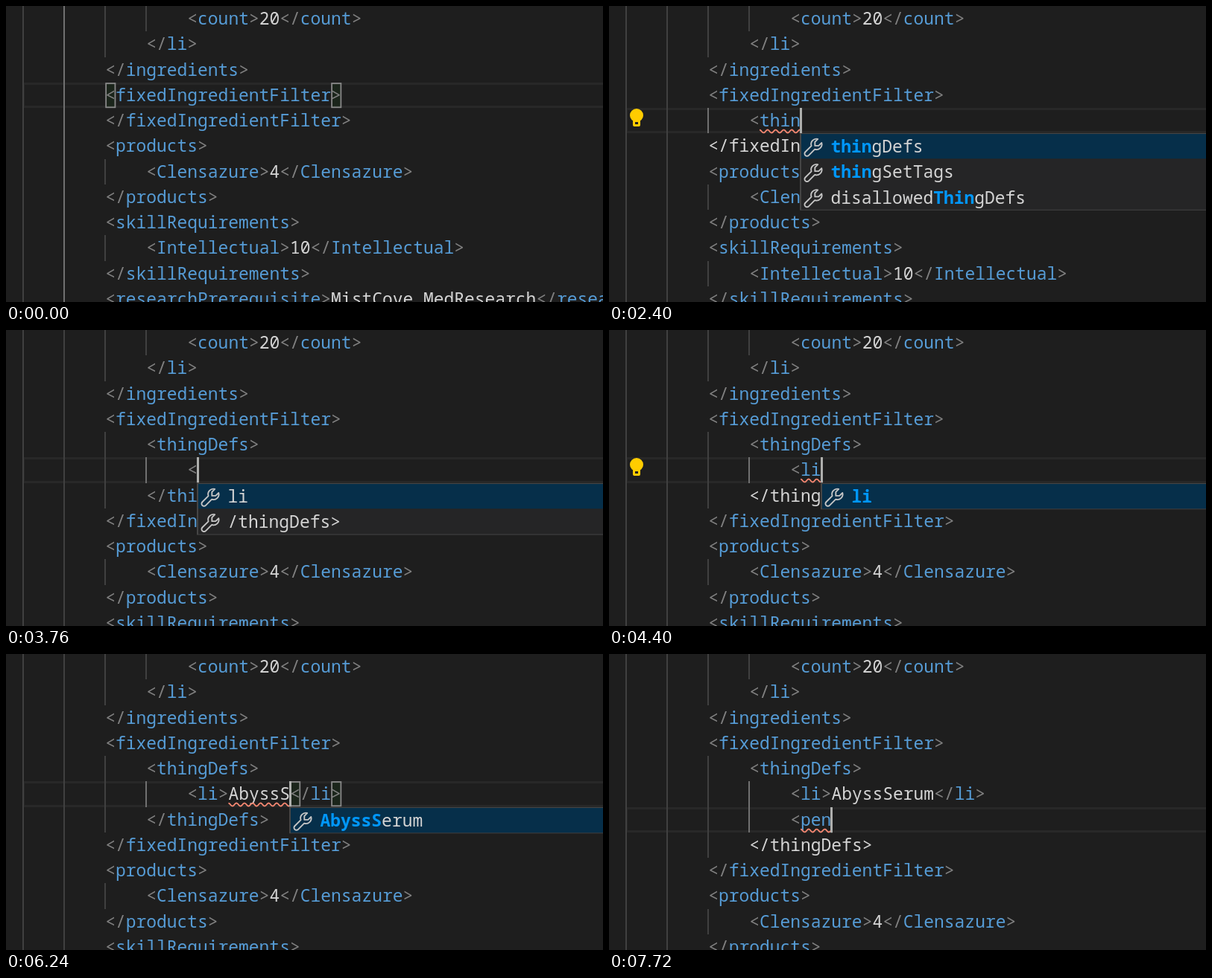
An HTML page with a canvas for the animation above (8 s loop, 801 by 398 pixels).

```html
<!DOCTYPE html>
<html lang="en">
<head>
<meta charset="utf-8">
<style>
  html, body { margin: 0; height: 100%; overflow: hidden; background: #1e1e1e; }
  canvas { display: block; }
</style>
</head>
<body>
<canvas width="801" height="398"></canvas>
<script>
const ctx = document.querySelector('canvas').getContext('2d');
const LOOP = 8000, ROW = 34.25, CHAR = 13.77, LEFT = 23;
const FONT = '22.95px "Noto Sans Mono", monospace';
const pad = n => ' '.repeat(n);
const colX = col => LEFT + col * CHAR;
const rowY = row => Math.round(row * ROW);

const HEAD = [
  pad(16) + '<count>20</count>',
  pad(12) + '</li>',
  pad(8) + '</ingredients>',
];
const TAIL = [
  pad(8) + '</fixedIngredientFilter>',
  pad(8) + '<products>',
  pad(12) + '<Clensazure>4</Clensazure>',
  pad(8) + '</products>',
  pad(8) + '<skillRequirements>',
  pad(12) + '<Intellectual>10</Intellectual>',
  pad(8) + '</skillRequirements>',
  pad(8) + '<researchPrerequisite>MistCove_MedResearch</researchPrerequisite>',
];
const FILTER = pad(8) + '<fixedIngredientFilter>';
const FIELDS = ['thingDefs', 'thingSetTags', 'disallowedThingDefs', 'thirdTierUse',
  'categories', 'allowedQualities', 'specialFilters', 'stuffCategories'];
const DEFS = ['Abbr', 'AbyssSerum', 'AnimalBed', 'Ambrosia', 'Apparel_BasicShirt', 'Apparel_BowlerHat'];
const CHILDREN = ['li', '/thingDefs>'];

// Edited block at each nesting depth; "|" marks the caret
const inFilter = s => [FILTER, pad(12) + s];
const inDefs = (...items) =>
  [FILTER, pad(12) + '<thingDefs>', ...items.map(s => pad(16) + s), pad(12) + '</thingDefs>'];
const def = s => inDefs(`<li>${s}|</li>`);
const second = s => inDefs('<li>AbyssSerum</li>', s + '|');

const STEPS = [
  [0, [FILTER + '|'], { noCaret: true }],
  [1520, inFilter('|'), { match: [3, 8, 30] }],
  [1600, inFilter('|')],
  [1920, inFilter('<|'), { list: FIELDS }],
  [2080, inFilter('<t|'), { list: FIELDS, bulb: true }],
  [2120, inFilter('<th|'), { list: FIELDS, bulb: true }],
  [2200, inFilter('<thi|'), { list: FIELDS, bulb: true }],
  [2400, inFilter('<thin|'), { list: FIELDS, bulb: true }],
  [2520, inFilter('<thing|'), { list: FIELDS, bulb: true }],
  [2760, inFilter('<thingDefs|')],
  [3000, inFilter('<thingDefs>|')],
  [3080, inFilter('<thingDefs>|</thingDefs>')],
  [3440, inDefs('|')],
  [3760, inDefs('<|'), { list: CHILDREN }],
  [4000, inDefs('<l|'), { list: CHILDREN }],
  [4400, inDefs('<li|'), { list: CHILDREN, bulb: true }],
  [4480, inDefs('<li|'), { bulb: true }],
  [4560, inDefs('<li>|'), { bulb: true }],
  [4640, def(''), { bulb: true }],
  [4880, def('')],
  [5320, def('A')],
  [5400, def('A'), { list: DEFS }],
  [5560, def('Ab'), { list: DEFS }],
  [5720, def('Aby'), { list: DEFS }],
  [5880, def('Abys'), { list: DEFS }],
  [6040, def('Abyss'), { list: DEFS }],
  [6240, def('AbyssS'), { list: DEFS }],
  [6480, def('AbyssSerum')],
  [6960, second(''), { match: [5, 30, 34] }],
  [7040, second('')],
  [7200, second('<'), { list: [...CHILDREN, 'prefab'] }],
  [7400, second('<p'), { list: ['prefab'] }],
  [7680, second('<pe')],
  [7720, second('<pen')],
];
const POINTER = [[520, 614, 326], [600, 560, 215], [680, 512, 108], [840, 459, 110],
  [920, 500, 112], [1000, 580, 115], [1080, 680, 120], [1160, 780, 125], [1240, -50, 0]];
const WRENCH = new Path2D('M11.3 1.7A4.2 4.2 0 0 0 6.2 7.1L1.4 11.9A1.9 1.9 0 0 0 4.1 14.6' +
  'L8.9 9.8A4.2 4.2 0 0 0 14.3 4.7L11.9 7H9V4.1Z');

const current = (steps, t) => steps.findLast(step => step[0] <= t);

function rect(x, y, w, h, color) {
  ctx.fillStyle = color;
  ctx.fillRect(x, y, w, h);
}

function write(text, x, y, color, weight = '') {
  ctx.font = `${weight} ${FONT}`;
  ctx.fillStyle = color;
  ctx.fillText(text, x, y);
}

function drawCode(line, row, plain) {
  let inTag = false;
  for (const { 0: token, index } of line.matchAll(/<\/?|>|[^<>\s]+/g)) {
    const bracket = /[<>]/.test(token);
    const color = plain ? '#d4d4d4' : bracket ? '#808080' : inTag ? '#569cd6' : '#d4d4d4';
    write(token, colX(index), rowY(row) + 25, color);
    if (bracket) inTag = token !== '>';
  }
}

function drawGuides(lines, caretRow) {
  const own = line => line.search(/\S/);
  const depth = lines.map((line, i) =>
    line.trim() ? own(line) : Math.max(own(lines[i - 1]), own(lines[i + 1])));
  const active = depth[caretRow] - 4;
  let first = caretRow, last = caretRow;
  while (depth[first - 1] > active) first--;
  while (depth[last + 1] > active) last++;
  depth.forEach((d, row) => {
    for (let col = 0; col < d; col += 4) {
      const lit = col === active && row >= first && row <= last;
      rect(Math.round(colX(col) - 1), rowY(row), 2, rowY(row + 1) - rowY(row), lit ? '#707070' : '#404040');
    }
  });
}

function findMatch(line, row, col) {
  if (line[col] === '<') return [row, col, line.indexOf('>', col)];
  if (line[col - 1] === '>') return [row, line.lastIndexOf('<', col), col - 1];
}

function drawMatch([row, ...cols]) {
  ctx.strokeStyle = '#888';
  ctx.lineWidth = 1.8;
  for (const col of cols) {
    const box = [colX(col) + 1, rowY(row) + 1, CHAR - 1.5, ROW - 2];
    rect(...box, 'rgba(0,100,0,.1)');
    ctx.strokeRect(...box);
  }
}

function drawSquiggle(row, col, length) {
  const start = colX(col), end = colX(col + length), y = rowY(row) + 31.5;
  ctx.beginPath();
  for (let x = start; x <= end; x++) ctx.lineTo(x, y - 2 * Math.cos((x - start) * Math.PI / 5.4));
  ctx.strokeStyle = '#f48771';
  ctx.lineWidth = 1.8;
  ctx.stroke();
}

function drawBulb(row) {
  const y = rowY(row);
  ctx.fillStyle = '#fc0';
  ctx.beginPath();
  ctx.arc(37, y + 10, 9, 0, 7);
  ctx.roundRect(32, y + 14, 10, 11, 2);
  ctx.fill();
  rect(35, y + 19, 4, 3, '#1e1e1e');
}

// Indices of the typed letters inside a suggestion, or null if it does not fit
function fuzzy(item, word) {
  const hits = [];
  let from = 0;
  for (const letter of word.toLowerCase()) {
    const at = item.toLowerCase().indexOf(letter, from);
    if (at < 0) return null;
    hits.push(at);
    from = at + 1;
  }
  return hits;
}

function drawPopup(list, word, row, col) {
  const items = list.map(item => [item, fuzzy(item, word)]).filter(([, hits]) => hits);
  const x = Math.round(colX(col)) - 1, y = rowY(row + 1), height = items.length * ROW;
  rect(x, y, 900, height + 1, '#454545');
  rect(x + 2, y + 1, 900, height - 1, '#252526');
  rect(x + 2, y + 1, 900, ROW - 1, '#062f4a');
  items.forEach(([item, hits], i) => {
    const top = y + i * ROW;
    ctx.save();
    ctx.translate(x + 5, top + 5);
    ctx.scale(1.7, 1.7);
    ctx.strokeStyle = '#c5c5c5';
    ctx.lineWidth = 1.1;
    ctx.lineJoin = 'round';
    ctx.stroke(WRENCH);
    ctx.restore();
    [...item].forEach((letter, k) => {
      const hit = hits.includes(k);
      write(letter, x + 41.5 + k * CHAR, Math.round(top + 26), hit ? '#0097fb' : '#d4d4d4', hit ? 'bold' : '');
    });
  });
}

function drawPointer(x, y) {
  rect(x - 1, y - 17, 2, 34, '#ddd');
  for (const end of [-18, 16]) rect(x - 7, y + end, 14, 2, '#ddd');
}

function draw(t) {
  const [, block, { list, bulb, match, noCaret } = {}] = current(STEPS, t);
  const marked = [...HEAD, ...block, ...TAIL];
  const row = marked.findIndex(line => line.includes('|'));
  const col = marked[row].indexOf('|');
  const lines = marked.map(line => line.replace('|', ''));
  const before = lines[row].slice(0, col);
  const word = before.match(/\w*$/)[0];
  const unclosed = /<\w+$/.test(before);

  rect(0, 0, 801, 398, '#1e1e1e');
  ctx.strokeStyle = '#282828';
  ctx.lineWidth = 3;
  ctx.strokeRect(23.5, rowY(row) + 1.5, 900, rowY(row + 1) - rowY(row) - 3);
  drawGuides(lines, row);
  const pair = match || findMatch(lines[row], row, col);
  if (pair) drawMatch(pair);
  lines.forEach((line, i) => drawCode(line, i, unclosed && i === row + 1));
  if (word && (unclosed || list)) drawSquiggle(row, col - word.length, word.length);
  if (bulb) drawBulb(row);
  if (!noCaret) rect(Math.round(colX(col)) - 1, rowY(row), 3, ROW, '#aeafad');
  if (list) drawPopup(list, word, row, col);
  const pointer = current(POINTER, t);
  if (pointer) drawPointer(pointer[1], pointer[2]);
}

function tick() {
  draw(performance.now() % LOOP);
  requestAnimationFrame(tick);
}
tick();
</script>
</body>
</html>
```
